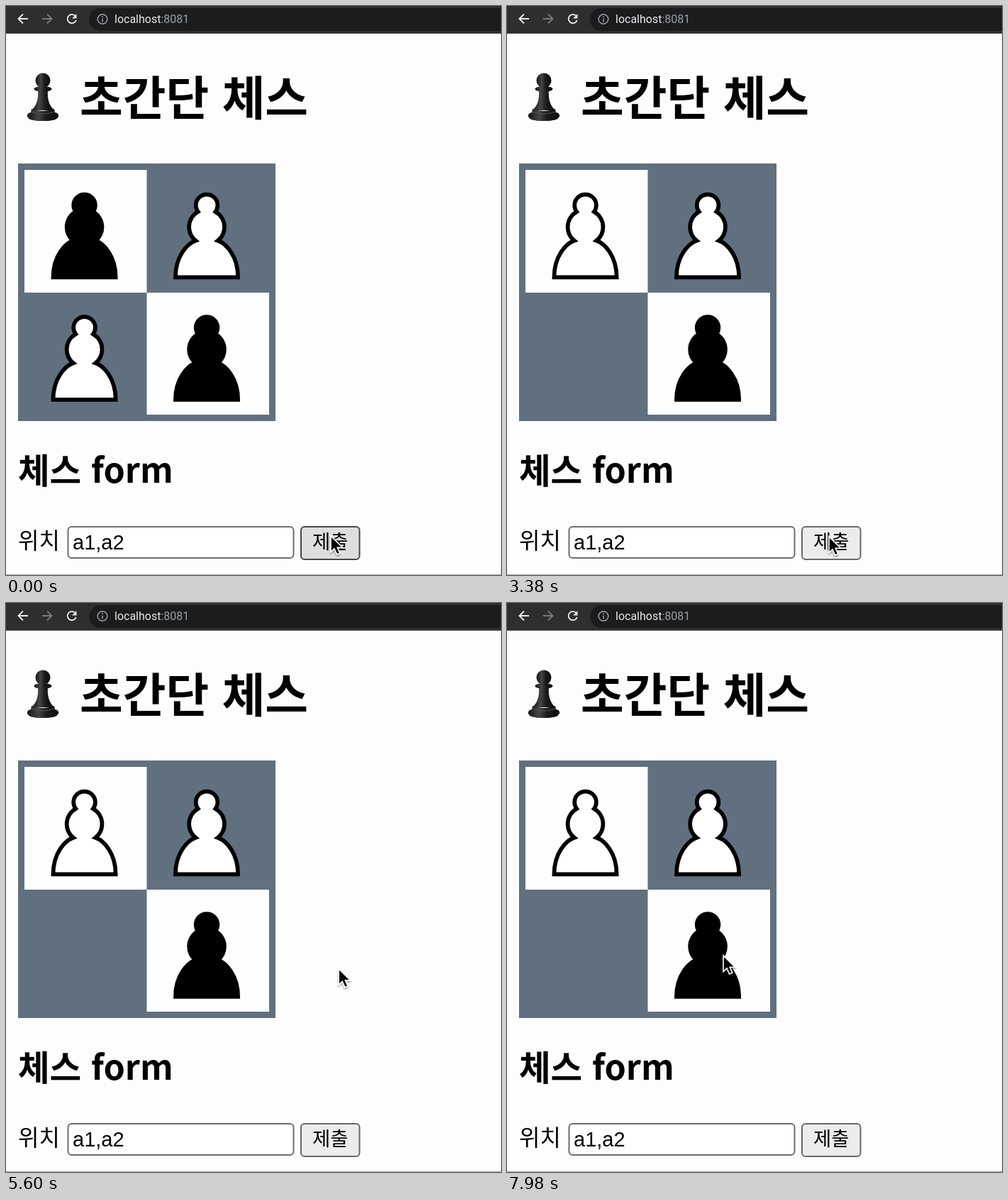
An HTML page that plays this animation: 698 by 802 pixels, repeating every 8000 ms.

```html
<!DOCTYPE html>
<html lang="ko">
<head>
<meta charset="utf-8">
<style>
  html, body { margin: 0; width: 100%; height: 100%; overflow: hidden; background: #fdfdfd; }
  svg { display: block; width: 698px; height: 802px; }
  text { font-family: "Noto Sans CJK KR", "Noto Sans CJK", sans-serif; white-space: pre; }
  .bold { font-weight: 700; }
  .url { font: 16px Roboto, sans-serif; }
  .field { font: 29px "Liberation Sans", Arial, sans-serif; }
  .icon { fill: none; stroke: #e8eaed; stroke-width: 1.9; }
  .white { fill: #fff; }
  .black { fill: #000; }
</style>
</head>
<body>
<svg viewBox="0 0 698 802">
  <defs>
    <path id="pawn" stroke="#000" stroke-width="1.5" d="M22.5 9c-2.21 0-4 1.79-4 4 0 .89.29 1.71.78 2.38C17.33 16.5 16 18.59 16 21c0 2.03.94 3.84 2.41 5.03C15.41 27.09 11 31.58 11 39.5H34C34 31.58 29.59 27.09 26.59 26.03 28.06 24.84 29 23.03 29 21 29 18.59 27.67 16.5 25.72 15.38 26.21 14.71 26.5 13.89 26.5 13c0-2.21-1.79-4-4-4z"/>
    <linearGradient id="ebony">
      <stop offset="0" stop-color="#151515"/>
      <stop offset=".35" stop-color="#454545"/>
      <stop offset=".6" stop-color="#1c1c1c"/>
      <stop offset="1" stop-color="#0c0c0c"/>
    </linearGradient>
    <filter id="shadow" x="-50%" y="-50%" width="200%" height="200%">
      <feDropShadow dx="0" dy="2" stdDeviation="1.3" flood-opacity=".4"/>
    </filter>
  </defs>

  <rect width="698" height="802" fill="#fdfdfd"/>

  <!-- Browser toolbar -->
  <rect width="698" height="39" fill="#2c2e30"/>
  <path d="M698 3H133a16 16 0 0 0 0 32H698z" fill="#1b1c1e"/>
  <path d="M0 38.5H698" stroke="#424447"/>
  <path class="icon" d="M31 18H18M24 11.5 17.5 18 24 24.5"/>
  <path class="icon" d="M51 18H64M58 11.5 64.5 18 58 24.5" style="stroke:#77797c"/>
  <g id="reload">
    <path class="icon" d="M98 14.5A6.2 6.2 0 1 0 98.8 20"/>
    <path d="M99.5 11V17.5H93z" fill="#e8eaed"/>
  </g>
  <path id="stop" class="icon" d="M87 12.5 98.5 24M98.5 12.5 87 24"/>
  <g class="icon" style="stroke:#9aa0a6;stroke-width:1.5">
    <circle cx="136" cy="18.5" r="6.8"/>
    <path d="M136 17.5V22.5M136 14.2V16"/>
  </g>
  <text class="url" x="153" y="24" fill="#e8eaed">localhost<tspan fill="#9aa0a6">:8081</tspan></text>

  <!-- Heading -->
  <g fill="url(#ebony)">
    <ellipse cx="52" cy="158" rx="20" ry="4" fill="#111"/>
    <path d="M45 118H59C58 132 61 140 68 147H36C43 140 46 132 45 118z"/>
    <path d="M36 145Q52 151 68 145L69 150Q75 151 74 156Q70 162 52 162T30 156Q29 151 35 150z"/>
    <ellipse cx="52" cy="117" rx="12.5" ry="4"/>
    <circle cx="52" cy="105" r="10.5"/>
  </g>
  <path d="M36 149Q52 155 68 149" fill="none" stroke="#555"/>
  <text class="bold" x="104" y="154" font-size="66">초간단 체스</text>

  <!-- Board -->
  <rect x="17" y="222" width="363" height="363" fill="#60707f"/>
  <path d="M26 231H198.5V404H26zM198.5 404H371V576H198.5z" fill="#fefefe"/>
  <g id="pieces"></g>

  <!-- Form -->
  <text class="bold" x="17" y="673" font-size="48.5">체스</text>
  <text class="bold" x="120" y="672" font-size="48.5">form</text>
  <text x="17" y="765" font-size="32">위치</text>
  <rect x="87.5" y="734" width="318" height="44" rx="5" fill="#fff" stroke="#6c6c72" stroke-width="2"/>
  <text class="field" x="94" y="766">a1,a2</text>
  <rect id="button" x="416" y="734" width="82.5" height="46" rx="5" stroke-width="2"/>
  <text x="432" y="765" font-size="27.5">제출</text>
  <path d="M0 801.5H698" stroke="#a9a9bd"/>

  <path id="cursor" d="M0 0V22.5L5 17.8 8.7 26 12.8 24.2 9.2 16.2H16.5z" stroke="#fff" stroke-width="1.6" filter="url(#shadow)"/>
</svg>
<script>
  const LOOP = 8000;
  const SQUARE = 172.5;
  const START = performance.now();
  const $ = id => document.getElementById(id);

  // Cursor stops: time, x, y
  const route = [
    [0, 458, 747], [1640, 458, 747], [1780, 456, 750], [2300, 456, 750],
    [2500, 454, 748], [3450, 454, 748], [3650, 456, 748], [4420, 456, 748],
    [4980, 476, 523], [5500, 476, 523], [6220, 349, 386],
    [6750, 349, 386], [7500, 305, 497], [LOOP, 305, 497]
  ];

  // Squares left to right, top to bottom: b = black, w = white, - = empty
  const boards = [[0, "bwwb"], [2600, "----"], [2960, "ww-b"]];
  const buttonLooks = [
    [0, "#dedee0", "#48484c"], [2330, "#f4f4f4", "#88888c"],
    [2450, "#ececee", "#68686c"], [3500, "#dedee0", "#48484c"],
    [4560, "#ececee", "#68686c"]
  ];

  const current = (states, t) => states.findLast(s => s[0] <= t);

  function cursorAt(t) {
    const i = Math.max(1, route.findIndex(stop => stop[0] > t));
    const [t0, x0, y0] = route[i - 1], [t1, x1, y1] = route[i];
    const p = (t - t0) / (t1 - t0);
    const eased = p * p * (3 - 2 * p);
    return [x0 + (x1 - x0) * eased, y0 + (y1 - y0) * eased];
  }

  function pieceMarkup(kind, i) {
    if (kind === "-") return "";
    const x = 24.3 + SQUARE * (i % 2), y = 231 + SQUARE * Math.floor(i / 2);
    const look = kind === "w" ? "white" : "black";
    return `<use href="#pawn" class="${look}" transform="translate(${x} ${y}) scale(${SQUARE / 45})"/>`;
  }

  let shownBoard;
  function draw(now) {
    const t = Math.max(0, now - START) % LOOP;
    const board = current(boards, t)[1];
    if (board !== shownBoard) {
      $("pieces").innerHTML = [...board].map(pieceMarkup).join("");
      shownBoard = board;
    }
    const [, fill, stroke] = current(buttonLooks, t);
    $("button").setAttribute("fill", fill);
    $("button").setAttribute("stroke", stroke);
    const loading = t >= 2480 && t < 3060;
    $("reload").style.display = loading ? "none" : "";
    $("stop").style.display = loading ? "" : "none";
    $("cursor").setAttribute("transform", `translate(${cursorAt(t)})`);
    requestAnimationFrame(draw);
  }
  draw(START);
</script>
</body>
</html>
```
